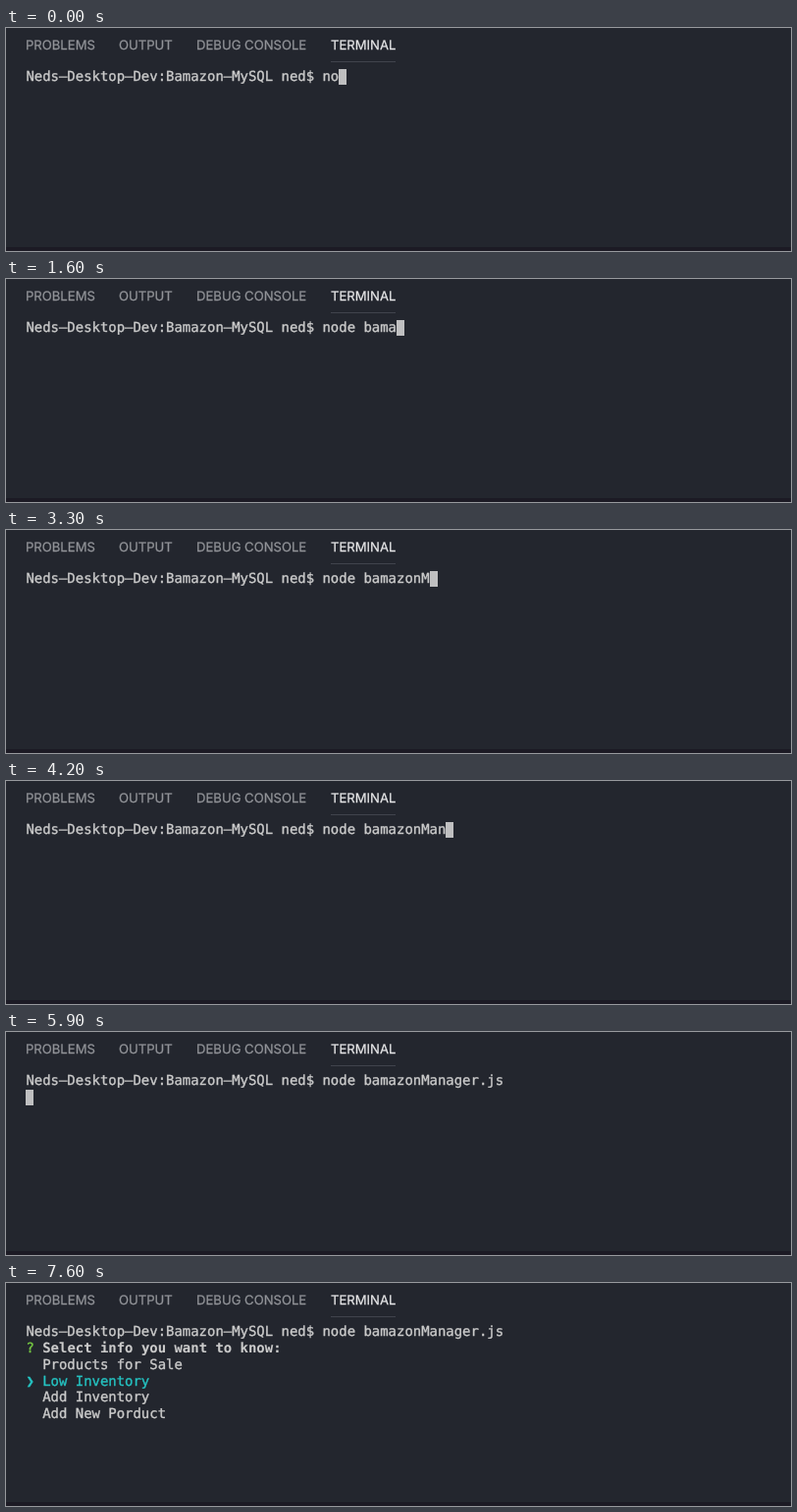
An HTML page that plays this animation: 800x228 px, repeating every 8000 ms.

```html
<!DOCTYPE html>
<html lang="en">
<head>
<meta charset="utf-8">
<title>Terminal</title>
<style>
  html, body { margin: 0; width: 100%; height: 100%; overflow: hidden; background: #23262e; }
  body { position: relative; text-rendering: geometricPrecision; }
  .tab { position: absolute; top: 10px; font: 13.1px/16px Inter, sans-serif; color: #929499; white-space: pre;
    -webkit-text-stroke: 0.25px; }
  .active { color: #e8e8e9; }
  .underline { position: absolute; left: 331px; top: 34px; width: 66px; height: 1px; background: #41444d; }
  .edge { position: absolute; left: 0; right: 0; top: 224px; height: 4px; background: #1c1a24; }
  #screen { position: absolute; left: 20.4px; top: 42px; margin: 0; color: #cbcbcb;
    font: 13.94px/16.85px "DejaVu Sans Mono", monospace; -webkit-text-stroke: 0.35px; }
  #screen b { -webkit-text-stroke: 0.1px; }
  #cursor { position: absolute; width: 8px; height: 16.4px; background: #bfbfc0; }
  .green { color: #76c943; }
  .cyan { color: #25c3c2; }
  .dim { color: #686a6e; }
  .mark { display: inline-block; width: 2ch; height: 16.85px; vertical-align: top; }
</style>
</head>
<body>
<span class="tab" style="left:20px">PROBLEMS</span>
<span class="tab" style="left:115px">OUTPUT</span>
<span class="tab" style="left:194px">DEBUG CONSOLE</span>
<span class="tab active" style="left:331px">TERMINAL</span>
<div class="underline"></div>
<pre id="screen"></pre>
<div id="cursor"></div>
<div class="edge"></div>
<script>
const LOOP = 8000, ENTER = 5900, MENU = 6500;
const CELL = 8.39, ROW = 16.85, LEFT = 20.4, TOP = 42;
const prompt = "Neds–Desktop–Dev:Bamazon–MySQL ned$ ";
const command = "node bamazonManager.js";
const choices = ["Products for Sale", "Low Inventory", "Add Inventory", "Add New Porduct"];

// When each character after "no" is typed.
const keyTimes = [100, 200, 600, 1100, 1400, 1500, 1600, 2300, 2400, 2600,
  3300, 3600, 4000, 4500, 4600, 4800, 5000, 5300, 5500, 5600];
// [time, selected choice]
const moves = [[MENU, 0], [6600, 1], [6800, 2], [7000, 3], [7300, 2], [7500, 1]];

const screen = document.getElementById("screen");
const cursor = document.getElementById("cursor");
let shown = "";

function menu(t) {
  const [since, selected] = moves.filter(([time]) => time <= t).pop();
  const hint = since === MENU ? ' <span class="dim">(Use arrow keys)</span>' : "";
  const rows = choices.map((label, i) => i === selected
    ? `<span class="cyan"><span class="mark">❯</span>${label}</span>`
    : `<span class="mark"></span>${label}`);
  return `<span class="green">?</span> <b>Select info you want to know:</b>${hint}\n` + rows.join("\n");
}

function draw(t) {
  const typed = 2 + keyTimes.filter(time => time <= t).length;
  const line = prompt + command.slice(0, typed);
  const html = line + (t >= MENU ? "\n" + menu(t) : "");
  if (html !== shown) screen.innerHTML = shown = html;

  const entered = t >= ENTER;
  cursor.style.display = t < MENU ? "block" : "none";
  cursor.style.left = LEFT + (entered ? 0 : line.length * CELL) + "px";
  cursor.style.top = TOP + (entered ? ROW : 0) + "px";
}

const start = performance.now();
function tick() {
  draw((performance.now() - start) % LOOP);
  requestAnimationFrame(tick);
}
tick();
</script>
</body>
</html>
```
